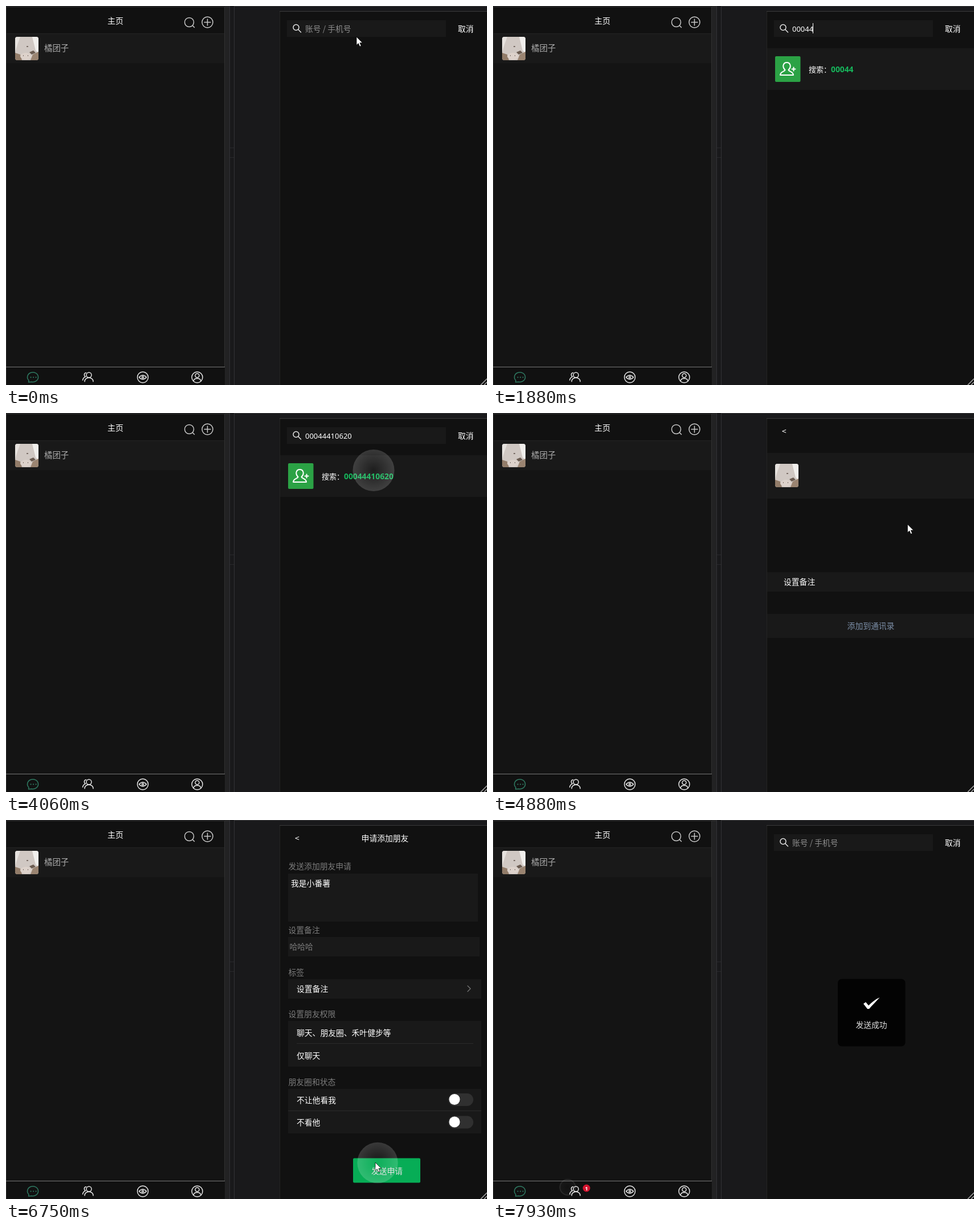
Recreate the animation shown at these times as an HTML page. Size 844 by 664 pixels, loop 8 s.

```html
<!DOCTYPE html>
<html lang="zh-CN">
<head>
<meta charset="utf-8">
<title>添加朋友</title>
<style>
html, body { margin: 0; width: 100%; height: 100%; overflow: hidden; background: #111; }
svg { display: block; width: 844px; height: 664px; }
text { font: 500 13.8px "Noto Sans CJK SC", "Noto Sans CJK", sans-serif; fill: #fff; }
.label { font-weight: 400; fill: #7c7c7c; }
.mid { text-anchor: middle; }
.digits { font: 13px "Noto Sans", sans-serif; }
.match { font: bold 13.8px "Noto Sans", sans-serif; fill: #16b75c; }
.box { fill: #191919; }
.line { fill: none; stroke: #e4e4e4; stroke-width: 1.5; stroke-linecap: round; stroke-linejoin: round; }
.rule { stroke: #2b2b2b; }
</style>
</head>
<body>
<svg viewBox="0 0 844 664">
  <defs>
    <radialGradient id="glow">
      <stop offset="0" stop-color="#fff" stop-opacity=".02"/>
      <stop offset="1" stop-color="#fff" stop-opacity=".17"/>
    </radialGradient>
    <clipPath id="avatarClip"><rect x="16" y="54" width="41" height="41" rx="4"/></clipPath>
    <g id="avatar" clip-path="url(#avatarClip)">
      <rect x="16" y="54" width="41" height="41" fill="#d0c8c3"/>
      <path d="M46 54H57V82L52 78Z" fill="#f1efec"/>
      <path d="M16 54H25L20 68L16 80Z" fill="#e6e2de"/>
      <path d="M16 82L25 85L28 95H16Z" fill="#927c69"/>
      <path d="M57 80L47 85L43 95H57Z" fill="#9a8471"/>
      <path d="M41 81L48 78L52 82L45 85Z" fill="#6b5c51"/>
      <ellipse cx="35" cy="88" rx="10" ry="6" fill="#ddd2cb"/>
      <path d="M30 87h1M38 87h1M36 71h3" stroke="#7d7069" stroke-width="2"/>
    </g>
    <g id="switch">
      <rect x="776" y="479" width="44" height="22" rx="11" fill="#303030"/>
      <circle cx="787" cy="489.5" r="9.5" fill="#fff"/>
    </g>
  </defs>

  <!-- backdrop between the two phones -->
  <rect width="844" height="664" fill="#19191b"/>
  <rect x="384" width="9" height="664" fill="#222223"/>
  <path d="M392.5 0V664M400.5 0V664" stroke="#333336"/>
  <path d="M393 248.5H400M393 265.5H400" stroke="#29292c"/>
  <path d="M400 .5H844" stroke="#3b3b3d"/>

  <!-- left phone -->
  <rect y="2" width="384" height="662" fill="#141414"/>
  <rect y="2" width="384" height="46" fill="#111"/>
  <path d="M0 1.5H392M.5 2V664M383.5 2V664" stroke="#303030"/>
  <rect x="1" y="49" width="382" height="51" class="box"/>
  <path d="M1 48.5H383" stroke="#242424"/>
  <text x="192" y="31" class="mid" style="font-size:14px">主页</text>
  <g class="line" style="stroke:#c8c8c8">
    <circle cx="321.5" cy="28.5" r="8"/><path d="M327.5 34.5L330.5 37.5"/>
    <circle cx="353.5" cy="28.5" r="9.5"/><path d="M348 28.5H359M353.5 23V34"/>
  </g>
  <use href="#avatar"/>
  <text x="67" y="79" class="label" style="font-size:14.4px;fill:#aaa">橘团子</text>
  <rect x="1" y="633" width="383" height="31" fill="#111"/>
  <path d="M0 632.5H384" stroke="#777"/>
  <g class="line">
    <g stroke="#2f7a62">
      <path d="M40 656A9.5 8.5 0 1 1 45 658.6L39.5 659Z"/>
      <path d="M43.5 650.5h.1M48 650.5h.1M52.5 650.5h.1" stroke-width="2.2"/>
    </g>
    <circle cx="145.5" cy="646.5" r="4.5"/>
    <path d="M138 658C138 649 153 649 153 658M140.5 642.5C136.5 643 136.5 648 139.5 649.5C136.5 650.5 135 653 134.5 655.5"/>
    <circle cx="240" cy="650.5" r="9.5"/>
    <path d="M233.5 650.5Q240 643.5 246.5 650.5Q240 657.5 233.5 650.5Z"/>
    <circle cx="240" cy="650.5" r="1.5"/>
    <circle cx="335.5" cy="650.5" r="9.5"/><circle cx="335.5" cy="647.5" r="3.5"/>
    <path d="M329 657C330 651 341 651 342 657"/>
  </g>
  <g id="badge">
    <circle cx="164" cy="645" r="6.5" fill="#d3142f"/>
    <text x="164" y="648.5" class="mid" style="font:bold 9.5px 'Noto Sans',sans-serif">1</text>
  </g>

  <!-- right phone -->
  <rect x="480" y="10" width="364" height="654" fill="#111"/>
  <path d="M480 9.5H844" stroke="#3a3a3a"/>
  <path d="M480.5 10V664" stroke="#242424"/>

  <g id="searchPage">
    <rect x="493" y="25" width="279" height="29" class="box"/>
    <g class="line"><circle cx="509" cy="37.5" r="5"/><path d="M513 41.5L517.5 46"/></g>
    <text id="hint" x="525" y="45" class="label" style="fill:#8c8c8c">账号 / 手机号</text>
    <text id="typed" x="525" y="45" class="digits"></text>
    <path id="caret" d="M.5 30V48" stroke="#fff"/>
    <text x="793" y="45">取消</text>
    <g id="result">
      <rect x="481" y="74" width="363" height="73" class="box"/>
      <rect x="495" y="88" width="44.5" height="45" rx="2" fill="#2ba245"/>
      <path class="line" style="stroke:#fff;stroke-width:2" d="M512.5 112C507 107 509 99 515.5 99S524 107 518.5 112C519 115 527 114.5 527 121H504C504 114.5 512 115 512.5 112ZM524.5 110.5H530.5M527.5 107.5V113.5"/>
      <text x="554" y="116" style="font-size:13px">搜索：</text>
      <text id="match" x="593" y="116" class="match"></text>
    </g>
  </g>

  <g id="profilePage">
    <text x="507" y="37">&lt;</text>
    <rect x="481" y="70" width="363" height="80" class="box"/>
    <use href="#avatar" x="479" y="35"/>
    <rect x="481" y="279" width="363" height="34" class="box"/>
    <text x="510" y="301">设置备注</text>
    <rect x="481" y="352" width="363" height="42" class="box"/>
    <text x="663" y="378" class="mid" style="fill:#7d90a9">添加到通讯录</text>
  </g>

  <g id="formPage">
    <text x="507" y="37">&lt;</text>
    <text x="665" y="37" class="mid">申请添加朋友</text>
    <text x="495.5" y="86" class="label">发送添加朋友申请</text>
    <rect x="495" y="94" width="333" height="84" class="box"/>
    <text x="500" y="116">我是小番薯</text>
    <text x="495.5" y="198" class="label">设置备注</text>
    <rect x="495" y="205" width="336" height="34" class="box"/>
    <text x="497.5" y="227" class="label">哈哈哈</text>
    <text x="495.5" y="272" class="label">标签</text>
    <rect x="495" y="279" width="339" height="34" class="box"/>
    <text x="510" y="301">设置备注</text>
    <path d="M810 290.5L815 295.5L810 300.5" class="line" style="stroke:#777;stroke-width:1.2"/>
    <text x="495.5" y="345" class="label">设置朋友权限</text>
    <rect x="495" y="352" width="339" height="80" class="box"/>
    <text x="510" y="378">聊天、朋友圈、禾叶健步等</text>
    <path d="M510 391.5H820" class="rule"/>
    <text x="510" y="417.5">仅聊天</text>
    <text x="495.5" y="464" class="label">朋友圈和状态</text>
    <rect x="495" y="471" width="339" height="78" class="box"/>
    <text x="510" y="495.5">不让他看我</text>
    <use href="#switch"/>
    <path d="M495 509.5H834" class="rule"/>
    <text x="510" y="535">不看他</text>
    <use href="#switch" y="39.5"/>
    <rect id="send" x="609" y="592.5" width="118" height="43" rx="2"/>
    <text id="sendText" x="668.5" y="620" class="mid">发送申请</text>
  </g>

  <g id="toast">
    <rect x="605" y="278.5" width="118.5" height="118" rx="7" fill="#030303"/>
    <path d="M650 322L654 319L659 325C665 319 671 314 678.5 311C672 318 665 325 660 331H657Z" fill="#fff"/>
    <text x="664" y="364" class="mid" style="fill:#ddd">发送成功</text>
  </g>

  <path d="M833 664L844 653M839 664L844 659" stroke="#aaa" stroke-width="1.5"/>
  <circle id="ripple" fill="url(#glow)" stroke="#fff" stroke-width="2"/>
  <path id="cursor" d="M0 0V14.5L3.3 11.5L5.7 17L8.2 16L5.9 10.6H10.5Z" fill="#fff" stroke="#000" stroke-width=".7"/>
</svg>
<script>
const LOOP = 8000;
const NUMBER = '00044410620';
const KEY_TIMES = [1150, 1280, 1350, 1550, 1880, 2150, 2420, 2690, 2960, 3170, 3370];
const FOCUS = 290, BLUR = 3790, BLINK = 530, DIGIT_WIDTH = 7.44;
const OPEN_PROFILE = 4130, OPEN_FORM = 5520, SENT = 6960;

// [time, x, y] of each click
const CLICKS = [[285, 601, 34], [3978, 645, 100.5], [5523, 684.5, 374.5], [6670, 652, 600.5], [7900, 131, 643.5]];

// visible strokes of the arrow, each a list of [time, x, y]
const PATHS = [
  [[0, 615, 54], [69, 615, 54], [70, 607, 46], [140, 603, 40]],
  [[3500, 606, 54], [3720, 640, 94]],
  [[4200, 652, 98], [4400, 672, 93], [4600, 672, 93], [4950, 741, 220], [5300, 677, 376],
   [5720, 677, 376], [6400, 648, 600], [7100, 648, 600], [7480, 420, 632], [7870, 172, 641], [7930, 172, 641]]
];

const el = id => document.getElementById(id);
const clamp = v => Math.max(0, Math.min(1, v));
const show = (id, on) => { el(id).style.display = on ? '' : 'none'; };
const set = (id, attrs) => { for (const k in attrs) el(id).setAttribute(k, attrs[k]); };

function drawTyping(t) {
  const count = t < OPEN_PROFILE ? KEY_TIMES.filter(k => k <= t).length : 0;
  const text = NUMBER.slice(0, count);
  el('typed').textContent = el('match').textContent = text;
  show('hint', !count);
  show('result', count);
  const lastKey = count ? KEY_TIMES[count - 1] : FOCUS;
  show('caret', t >= FOCUS && t < BLUR && (t - lastKey) % (2 * BLINK) < BLINK);
  set('caret', { transform: `translate(${Math.round(524 + count * DIGIT_WIDTH)} 0)` });
}

function drawRipple(t) {
  const click = CLICKS.find(c => t >= c[0] && t < c[0] + 200);
  show('ripple', click);
  if (!click) return;
  const [start, cx, cy] = click, age = t - start;
  set('ripple', {
    cx, cy, r: Math.min(36.5, age * .44),
    'fill-opacity': clamp((age - 20) / 60),
    'stroke-opacity': .16 * clamp(1 - age / 65),
    opacity: clamp((200 - age) / 90)
  });
}

function drawCursor(t) {
  const path = PATHS.find(p => t >= p[0][0] && t < p[p.length - 1][0]);
  show('cursor', path);
  if (!path) return;
  const i = path.findIndex(p => p[0] > t);
  const [t0, x0, y0] = path[i - 1], [t1, x1, y1] = path[i];
  const k = (t - t0) / (t1 - t0);
  set('cursor', { transform: `translate(${x0 + (x1 - x0) * k} ${y0 + (y1 - y0) * k})` });
}

function draw(t) {
  const inForm = t >= OPEN_FORM && t < SENT, pressed = t >= 6650;
  show('searchPage', t < OPEN_PROFILE || t >= SENT);
  show('profilePage', t >= OPEN_PROFILE && t < OPEN_FORM);
  show('formPage', inForm);
  set('send', { fill: pressed ? '#07ad56' : '#07c160' });
  el('sendText').style.fill = pressed ? '#e0e0e0' : '#fff';
  show('badge', t >= SENT);
  show('toast', t >= SENT);
  set('toast', { opacity: clamp((t - SENT) / 200) });
  drawTyping(t);
  drawRipple(t);
  drawCursor(t);
}

const begin = performance.now();
function tick() {
  draw((performance.now() - begin) % LOOP);
  requestAnimationFrame(tick);
}
tick();
</script>
</body>
</html>
```
